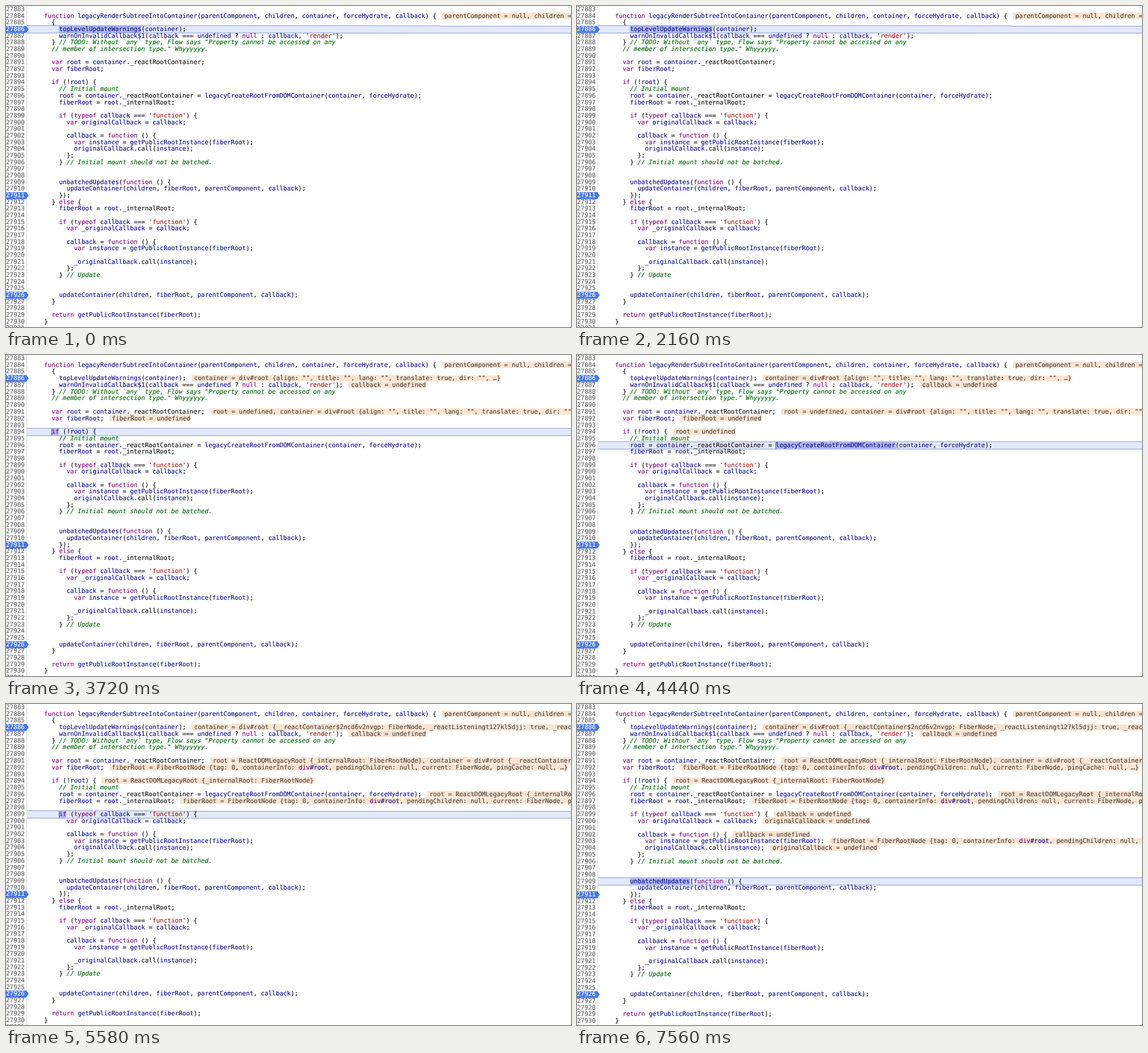
Recreate the animation shown at these times as an HTML page. Size 993x564 px, loop 7620 ms.

```html
<!DOCTYPE html>
<html lang="en">
<head>
<meta charset="utf-8">
<title>Debugger stepping</title>
<style>
  html, body { margin: 0; width: 100%; height: 100%; overflow: hidden; background: #fff; }
  #editor {
    position: relative; width: 993px; height: 564px; overflow: hidden;
    font: 10.92px/11.67px "DejaVu Sans Mono", monospace;
    text-rendering: geometricPrecision; -webkit-text-stroke: 0.15px;
    white-space: pre; color: #101010;
  }
  #editor::before {
    content: ""; position: absolute; left: 36px; top: 0; width: 1px; height: 100%; background: #d8d8d8;
  }
  .row { position: absolute; left: 0; top: 0; width: 993px; height: 12px; }
  .num { position: absolute; left: 0; width: 40px; height: 100%; color: #626262; }
  .stop .num {
    top: -0.5px; height: 12.5px; padding-top: 0.5px; color: #fff; background: #4779e2;
    clip-path: polygon(0 0, 35px 0, 40px 50%, 35px 100%, 0 100%);
  }
  .code { position: absolute; left: 37px; right: 0; height: 100%; padding-left: 30px; }
  .on .code { background: #e3e9fd; box-shadow: 0 -1px #8598cf, 0 1px #8598cf; }
  .k { color: #800878; }
  .v { color: #101088; }
  .s { color: #a81616; }
  .c { color: #006808; font-style: italic; }
  mark { display: inline-block; line-height: 12px; background: #aeb9f4; color: inherit; }
  .blink mark { box-shadow: inset 1px 0 #555; }
  .note {
    display: inline-block; margin-left: 9.5px; padding: 0 1px 0 4.5px;
    line-height: 11px; background: #fbe3d0; color: #4c4642;
  }
</style>
</head>
<body>
<div id="editor"></div>
<script>
const LOOP = 7620, LAG = 170, BLINK = 530;
const FIRST = 27883, TOP = 0.1, PITCH = 11.674, NOTE_GAP = 0.18;
const STOPS = [27886, 27911, 27926];

const code = `
function legacyRenderSubtreeIntoContainer(parentComponent, children, container, forceHydrate, callback) {
  {
    topLevelUpdateWarnings(container);
    warnOnInvalidCallback$1(callback === undefined ? null : callback, 'render');
  } // TODO: Without \`any\` type, Flow says "Property cannot be accessed on any
  // member of intersection type." Whyyyyyy.

  var root = container._reactRootContainer;
  var fiberRoot;

  if (!root) {
    // Initial mount
    root = container._reactRootContainer = legacyCreateRootFromDOMContainer(container, forceHydrate);
    fiberRoot = root._internalRoot;

    if (typeof callback === 'function') {
      var originalCallback = callback;

      callback = function () {
        var instance = getPublicRootInstance(fiberRoot);
        originalCallback.call(instance);
      };
    } // Initial mount should not be batched.


    unbatchedUpdates(function () {
      updateContainer(children, fiberRoot, parentComponent, callback);
    });
  } else {
    fiberRoot = root._internalRoot;

    if (typeof callback === 'function') {
      var _originalCallback = callback;

      callback = function () {
        var instance = getPublicRootInstance(fiberRoot);

        _originalCallback.call(instance);
      };
    } // Update


    updateContainer(children, fiberRoot, parentComponent, callback);
  }

  return getPublicRootInstance(fiberRoot);
}
`.split("\n");

// Each pause of the debugger: time, line, selected token
const steps = [
  [-700, 27886, "topLevelUpdateWarnings"],
  [2340, 27887, "warnOnInvalidCallback$1"],
  [2880, 27891, "_reactRootContainer"],
  [3480, 27894, "if"],
  [4080, 27896, "legacyCreateRootFromDOMContainer"],
  [4920, 27897, "_internalRoot"],
  [5400, 27899, "if"],
  [6540, 27909, "unbatchedUpdates"],
].map(([at, line, token]) => ({ at, line, token }));

const TOKENS = /(\/\/.*)|('[^']*')|\b(function|var|if|else|return|typeof|null)\b|(\.\w+)|([\w$]+)/g;
const span = (cls, text) => `<span class="${cls}">${text}</span>`;
const paint = line => line.replace(TOKENS, (text, comment, string, keyword, member) =>
  member ? text : span(comment ? "c" : string ? "s" : keyword ? "k" : "v", text));
const painted = code.map(paint);

// Inline values known once the debugger has reached the given step
function notesAt(step) {
  const mounted = step >= 5;
  const container = "container = div#root " + (mounted
    ? "{__reactContainer$2ncd6v2nvgp: FiberNode, _reactListeningt127kl5djj: true, _reactRootContainer: ReactDOMLegacyRoot, …}"
    : '{align: "", title: "", lang: "", translate: true, dir: "", …}');
  const root = "root = " + (mounted ? "ReactDOMLegacyRoot {_internalRoot: FiberRootNode}" : "undefined");
  const fiber = "fiberRoot = " + (step >= 6
    ? `FiberRootNode {tag: 0, containerInfo: ${span("k", "div")}${span("v", "#root")}, pendingChildren: null, current: FiberNode, pingCache: null, …}`
    : "undefined");
  const callback = "callback = undefined", saved = "originalCallback = undefined";
  const notes = {
    27884: "parentComponent = null, children = {$$typeof: Symbol(react.element)}",
    27886: container, 27887: callback,
    27891: `${root}, ${container}`, 27892: fiber,
    27894: root, 27896: `${root}, ${container}`, 27897: fiber,
    27899: callback, 27900: saved, 27902: callback, 27903: fiber, 27904: saved,
  };
  return line => line < steps[step].line ? notes[line] : undefined;
}

const editor = document.getElementById("editor");

function render(step, known) {
  const { line: active, token } = steps[step];
  const noteFor = notesAt(known);
  let y = TOP;
  editor.innerHTML = painted.map((html, i) => {
    const line = FIRST + i, note = noteFor(line), on = line === active;
    const body = on ? html.replace(token, () => `<mark>${token}</mark>`) : html;
    const cls = "row" + (on ? " on" : "") + (STOPS.includes(line) ? " stop" : "");
    // The invisible skew keeps text baselines from snapping to whole pixels
    const row = `<div class="${cls}" style="transform:translateY(${y.toFixed(2)}px) skewY(.002deg)">` +
      `<div class="code">${body}${note ? span("note", note) : ""}</div><div class="num">${line}</div></div>`;
    y += PITCH + (note && line !== 27884 ? NOTE_GAP : 0);
    return row;
  }).join("");
}

let shown = "";
function tick() {
  const t = performance.now() % LOOP;
  const step = steps.findLastIndex(s => t >= s.at);
  const age = t - steps[step].at;
  const known = age < LAG ? step - 1 : step;
  const key = `${step}/${known}`;
  if (key !== shown) {
    render(step, known);
    shown = key;
  }
  editor.classList.toggle("blink", Math.floor(age / BLINK) % 2 === 0);
  requestAnimationFrame(tick);
}
tick();
</script>
</body>
</html>
```
